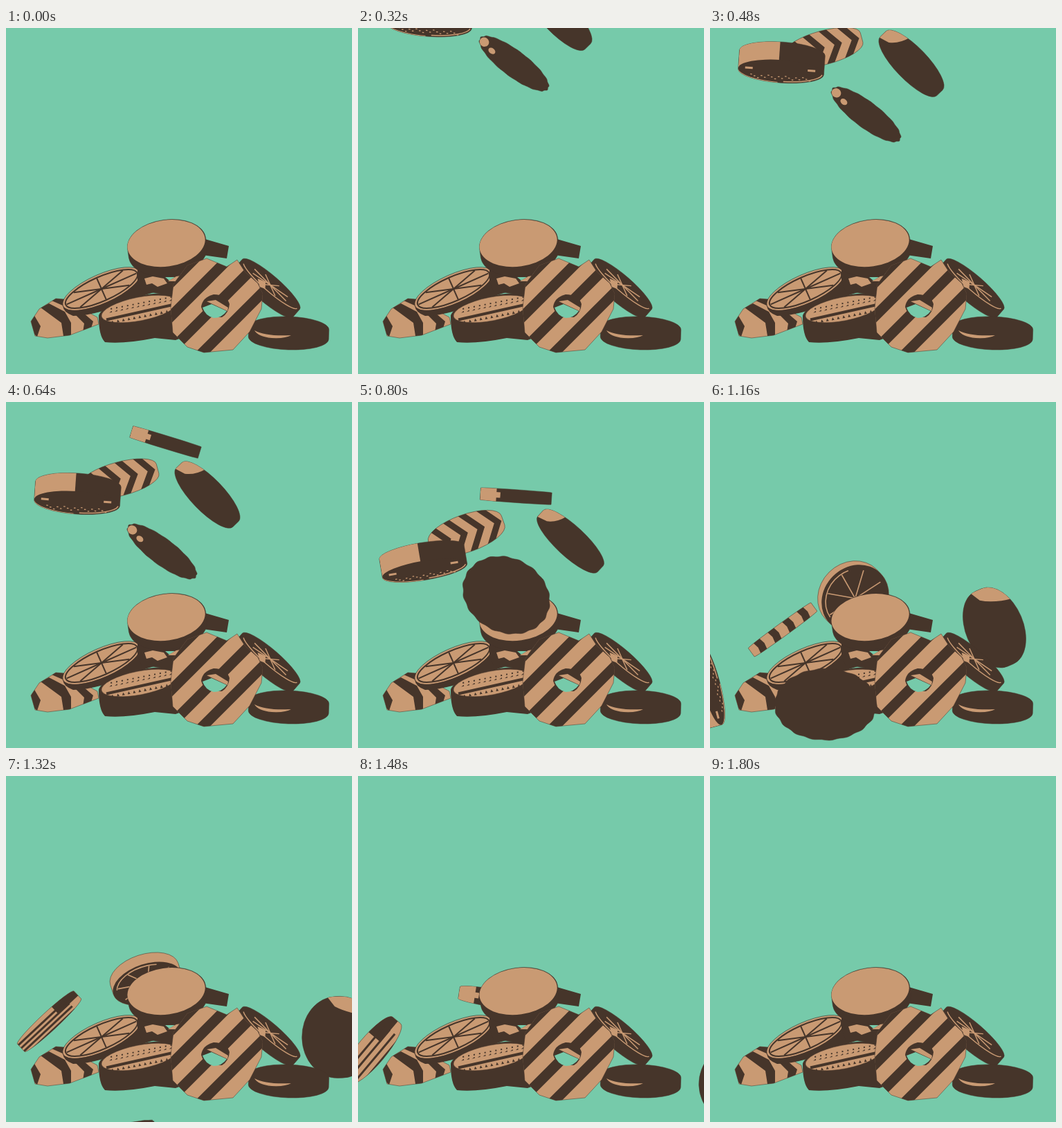
Write an HTML page with a canvas that moves like this. It is 500 px wide and 500 px high and loops after 1880 ms.

```html
<!DOCTYPE html>
<html lang="en">
<head>
<meta charset="utf-8">
<title>Falling cookies</title>
<style>
  html, body { margin: 0; width: 100%; height: 100%; overflow: hidden; background: #76caaa; }
  canvas { display: block; width: 100vw; height: 100vh; }
</style>
</head>
<body>
<canvas id="stage" width="500" height="500"></canvas>
<script>
const ctx = document.getElementById('stage').getContext('2d');
const MINT = '#76caaa', TAN = '#c99a73', DARK = '#46352a';
const LOOP = 1880, STEP = 40, LAST = 1800, TAU = Math.PI * 2, DEG = Math.PI / 180;

// ---- drawing helpers ----
function fill(color, d) {
  ctx.fillStyle = color;
  ctx.fill(new Path2D(d));
}

function line(color, width, d) {
  ctx.strokeStyle = color;
  ctx.lineWidth = width;
  ctx.stroke(new Path2D(d));
}

function oval(color, x, y, rx, ry) {
  ctx.fillStyle = color;
  ctx.beginPath();
  ctx.ellipse(x, y, rx, ry, 0, 0, TAU);
  ctx.fill();
}

function arc(color, width, y, rx, ry, from, to) {
  ctx.strokeStyle = color;
  ctx.lineWidth = width;
  ctx.beginPath();
  ctx.ellipse(0, y, rx, ry, 0, from, to);
  ctx.stroke();
}

function spokes(color, width, y, rx, ry, turn = 0) {
  for (let i = 0; i < 8; i++) {
    const a = (i + turn) / 8 * TAU;
    line(color, width, `M0 ${y}L${Math.cos(a) * rx} ${y + Math.sin(a) * ry}`);
  }
}

function local(x, y, rot, draw) {
  ctx.save();
  ctx.translate(x, y);
  ctx.rotate(rot * DEG);
  draw();
  ctx.restore();
}

// A tilted disc: an ellipse swept along its local y axis.
function slab({ rx, ry, h }) {
  const p = new Path2D();
  p.ellipse(0, -h / 2, rx, ry, 0, Math.PI, TAU);
  p.ellipse(0, h / 2, rx, ry, 0, 0, Math.PI);
  p.closePath();
  return p;
}

function scalloped({ rx, ry, h }) {
  const p = new Path2D();
  for (let i = 0; i < 180; i++) {
    const a = i / 180 * TAU, r = 1 + 0.012 * Math.sin(a * 18);
    p.lineTo(Math.cos(a) * rx * r, Math.sin(a) * (ry * r + h / 2));
  }
  p.closePath();
  return p;
}

function biscuit(path, color, details) {
  ctx.save();
  ctx.fillStyle = color;
  ctx.fill(path);
  ctx.strokeStyle = DARK;
  ctx.lineWidth = 0.5;
  ctx.stroke(path);
  ctx.clip(path);
  if (details) details();
  ctx.restore();
}

// ---- resting pile ----
function restingStriped() {
  biscuit(new Path2D('M36 424L48 406L72 391L84 392L132 418L134 428L92 444L60 448L42 445Z'), TAN, () => {
    fill(DARK, 'M36 424L40 414L50 431L45 446L38 440Z');
    fill(DARK, 'M50 404L62 398L85 410L94 426V445H83L80 426Z');
    fill(DARK, 'M66 394L75 388L92 395L98 408Z');
    fill(DARK, 'M98 412H112L126 424L122 437L111 440L113 427Z');
  });
}

function restingCitrus() {
  fill(DARK, 'M82 401Q83 411 97 416Q137 415 181 392L240 374L238 352L194 349Z');
  local(138, 377, -24, () => {
    oval(TAN, 0, 0, 60.5, 20.5);
    arc(DARK, 0.6, 0, 61, 21, 0, TAU);
    arc(DARK, 2, 0, 56.5, 17.5, 0, TAU);
    spokes(DARK, 2, 0, 55, 16.5);
  });
}

function restingWafer() {
  fill(DARK, 'M134 417C134 402 190 380 245 383L262 445L245 451L215 448Q170 457 143 454Q134 445 134 417Z');
  local(193, 406, -11, () => biscuit(slab({ rx: 56, ry: 17, h: 0 }), TAN, () => {
    line(DARK, 4, 'M-50 6L55 3');
    for (let x = -44; x < 50; x += 8) {
      fill(DARK, `M${x} -3l4 -2v2zM${x + 3} -9h2v2h-2zM${x} 13l2 -4l2 4z`);
    }
  }));
}

function restingTop() {
  fill(DARK, 'M190 348L255 346L246 386L196 381L190 366Z');
  fill(TAN, 'M200 362L212 359L228 362L233 369L219 374L211 369L203 371Z');
  fill(MINT, 'M230 360L244 360L236 365Z');
  fill(TAN, 'M234 366L246 359L258 357L246 366Z');
  local(233, 317.5, -8, () => {
    biscuit(slab({ rx: 57, ry: 34, h: 13 }), DARK);
    oval(TAN, -0.5, -6.5, 56.5, 33.5);
  });
}

function restingWedges() {
  local(378, 376, 41, () => biscuit(slab({ rx: 55, ry: 12, h: 15 }), DARK, () => {
    arc(TAN, 1.5, -6, 51, 9, 0, 2.9);
    spokes(TAN, 1.5, -6, 34, 8, 0.4);
    fill(TAN, 'M-20 -1L-8 -5L-2 3L-10 6Z');
  }));
}

function restingDome() {
  local(408.5, 441, 2, () => biscuit(slab({ rx: 58, ry: 17, h: 14 }), DARK));
  fill(TAN, 'M359 437Q376 446 412 444Q404 449 384 448Q364 446 359 437Z');
}

function restingRing() {
  biscuit(new Path2D('M262 343L290 333L319 345L334 335L345 352L364 369L371 384L369 406L352 439L328 465L286 469L262 461L241 440L238 404L242 370Z'), TAN, () => {
    for (let sum = 606; sum < 780; sum += 49) line(DARK, 15, `M${sum - 500} 500L${sum - 300} 300`);
  });
  fill(DARK, 'M282 403Q284 389 300 385Q319 385 323 399Q322 412 312 418L294 418Q285 414 282 403Z');
  fill(MINT, 'M284 404L297 399L319 409Q312 419 300 419Q288 416 284 404Z');
  fill(TAN, 'M290 395L303 393L321 404L320 409Z');
}

function drawPile() {
  fill(DARK, 'M284 304L322 315L319 333L284 328Z');
  restingStriped();
  restingCitrus();
  restingWafer();
  restingTop();
  restingWedges();
  restingDome();
  restingRing();
}

// ---- falling cookies, drawn in local coordinates ----
function drawStriped(p) {
  const half = p.ry + p.h / 2, w = p.rx * 0.2, bend = p.ry * 0.5;
  biscuit(slab(p), TAN, () => {
    if (p.tilt < 0) { // underside: stripes run lengthwise
      fill(DARK, `M${p.rx * 0.3} ${-half}H${p.rx}V${half * 0.1}H${p.rx * 0.3}Z`);
      for (let y = -half * 0.4; y < half; y += half * 0.45) line(DARK, 3, `M${-p.rx} ${y}H${p.rx * 0.7}`);
      return;
    }
    for (let x = -p.rx * 0.8; x < p.rx * 1.2; x += p.rx * 0.46) {
      fill(DARK, `M${x - bend} ${-half}h${w}L${x + w + bend} 0L${x + w - bend} ${half}h${-w}L${x + bend} 0Z`);
    }
  });
}

function drawDipped(p) {
  const low = p.h / 2;
  biscuit(slab(p), DARK, () => {
    ctx.fillStyle = TAN;
    ctx.fillRect(-p.rx, -60, p.rx - 4, 120);
    oval(DARK, 0, low - 1, p.rx, p.ry);
    arc(TAN, 1.5, low - 1, p.rx - 2, p.ry - 1, 0.1, 1.5);
    ctx.fillStyle = TAN;
    for (let i = 0; i < 18; i++) ctx.fillRect(i * 5 - 44, low + p.ry * (0.35 + i * 7 % 5 * 0.07), 2.5, 1.3);
    ctx.fillRect(-p.rx * 0.84, low - 4, 11, 3);
    ctx.fillRect(p.rx * 0.62, low - 6, 11, 3);
  });
}

function drawWedges(p) {
  const edgeOn = p.ry < 12;
  biscuit(slab(p), edgeOn ? DARK : TAN, () => {
    if (edgeOn) {
      ctx.fillStyle = TAN;
      ctx.fillRect(-p.rx, -40, p.rx * 0.45, 80);
      ctx.fillRect(-p.rx, -4, p.rx * 0.56, 8);
      return;
    }
    oval(DARK, 0, p.h / 2, p.rx, p.ry);
    spokes(TAN, 1.6, p.h / 2, p.rx * 0.85, p.ry * 0.85, 0.3);
    arc(TAN, 1.6, p.h / 2, p.rx * 0.88, p.ry * 0.88, 3.3, 5.2);
  });
}

function drawCoated(p) {
  const y = p.ry + p.h / 2, x = -p.rx * 0.72;
  biscuit(slab(p), DARK, () => {
    fill(TAN, `M${-p.rx} ${-y}H${x + 14}Q${x + 10} ${-y * 0.3} ${x - 2} ${y * 0.1}L${-p.rx} ${y * 0.3}Z`);
  });
}

function drawShortbread(p) {
  biscuit(scalloped(p), DARK, () => {
    if (p.ry > p.rx / 2) return;
    oval(TAN, -p.rx * 0.87, 1, 7, 6.5);
    oval(TAN, -p.rx * 0.6, p.ry * 0.3, 5.5, 4);
  });
}

// ---- motion ----
// Each point is x, y, rotation, tilt at the matching time in BEATS.
const BEATS = [640, 960, 1160, 1480];
const GRAVITY = 0.00031, ENTRY_SPEED = 0.567;

const behind = [
  { draw: drawWedges, r: 51.5, thick: 17,
    points: [[230.5, 58, 17, 1], [226, 230, -9, 1], [207, 281, -45, 62], [197, 321, 9, 5]] },
  { draw: drawStriped, r: 56, thick: 15,
    points: [[165, 111, -15, 18], [148.5, 284, -24, 24], [105, 329, -36, 2], [20, 396, -50, -14]] },
  { draw: drawDipped, r: 62, thick: 28,
    points: [[103.5, 132.5, 4, 15], [85, 344, -23, 10], [-12, 410, -105, 12]] },
  { draw: drawCoated, r: 59, thick: 12,
    points: [[291, 134, 46, 18], [323, 284, 40, 14], [411, 326, 67, 39]] },
];
const shortbread = { draw: drawShortbread, r: 61, thick: 6, pull: 1.1, grow: 0.0004,
  points: [[225.5, 216, 37, 15], [203, 358, 18, 90], [167, 437, 0, 138]] };

// Straight drop to the first point, then ballistic hops; the last hop carries on off stage.
function poseAt({ points, r, thick, pull = 1, grow = 0 }, t) {
  const since = t - BEATS[0];
  let x, y, rot, tilt;
  if (since < 0) {
    [x, y, rot, tilt] = points[0];
    y += pull * (ENTRY_SPEED * since + GRAVITY * since * since);
  } else {
    let i = 0;
    while (i < points.length - 2 && t > BEATS[i + 1]) i++;
    const span = BEATS[i + 1] - BEATS[i], u = (t - BEATS[i]) / span;
    [x, y, rot, tilt] = points[i].map((v, k) => v + (points[i + 1][k] - v) * u);
    y -= GRAVITY * span * span * u * (1 - u);
  }
  const rx = r * (1 + grow * Math.max(0, since));
  return { x, y, rot, tilt, rx,
    ry: rx * Math.abs(Math.sin(tilt * DEG)),
    h: thick * Math.abs(Math.cos(tilt * DEG)) };
}

function drop(cookie, t) {
  const p = poseAt(cookie, t);
  local(p.x, p.y, p.rot, () => cookie.draw(p));
}

const start = performance.now();

function frame() {
  const elapsed = Math.max(0, performance.now() - start) % LOOP;
  const t = Math.min(LAST, Math.floor(elapsed / STEP) * STEP);
  const falling = t < LAST;
  ctx.fillStyle = MINT;
  ctx.fillRect(0, 0, 500, 500);
  if (falling) behind.forEach(cookie => drop(cookie, t));
  drawPile();
  if (falling) drop(shortbread, t);
  requestAnimationFrame(frame);
}
frame();
</script>
</body>
</html>
```
